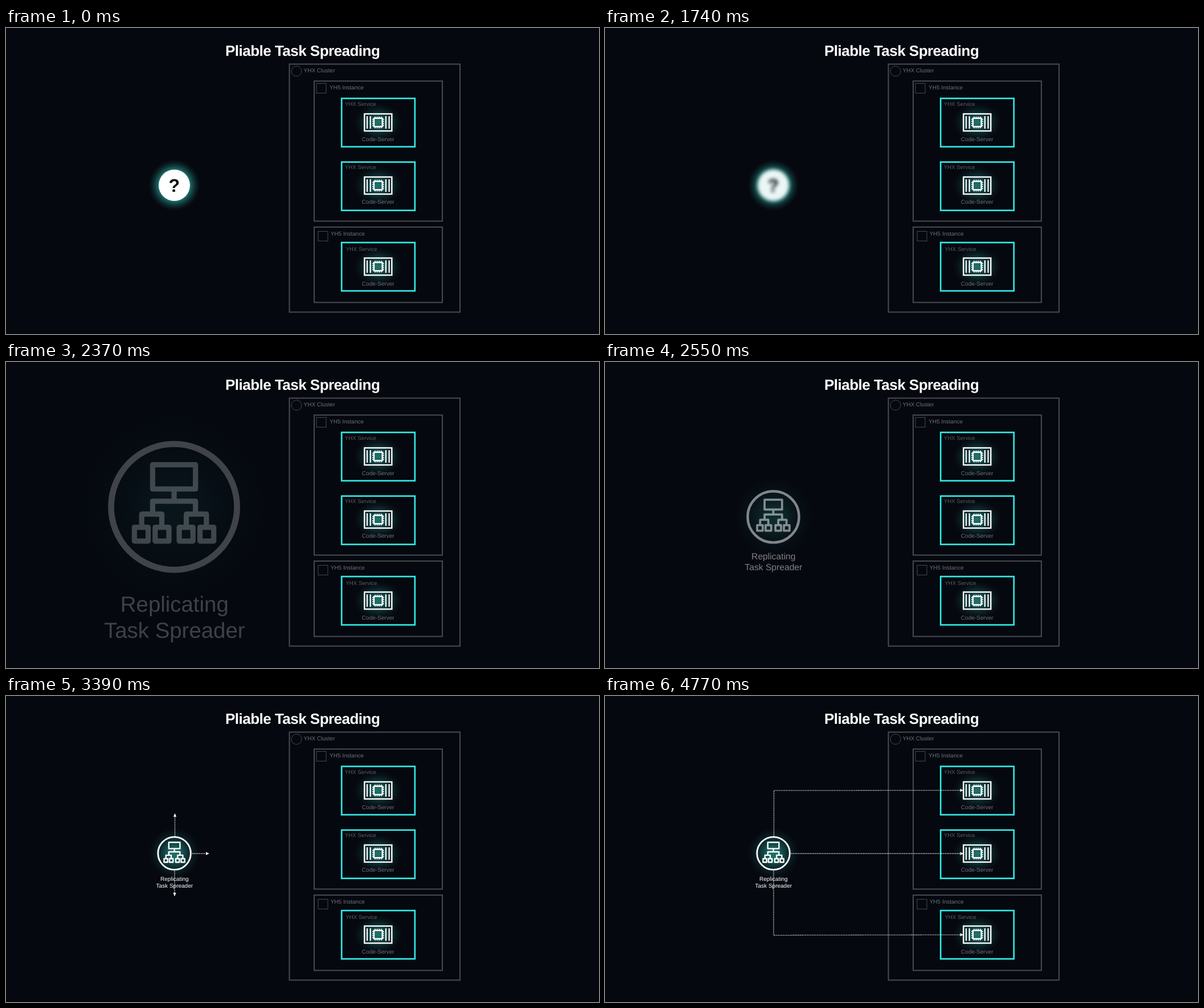
Recreate the animation shown at these times as an HTML page with a canvas. Size 1041x538 px, loop 6630 ms.

```html
<!DOCTYPE html>
<html lang="en">
<head>
<meta charset="utf-8">
<title>Pliable Task Spreading</title>
<style>
  html, body { margin: 0; width: 100%; height: 100%; overflow: hidden; background: #05080f; }
  canvas { display: block; width: 1041px; height: 538px; }
</style>
</head>
<body>
<canvas id="stage"></canvas>
<script>
const W = 1041, H = 538, LOOP = 6630;
const BG = '#05080f', FRAME = '#46484b', CYAN = '#30e8e4', WHITE = '#fff';
const FONT = '"Liberation Sans", Arial, sans-serif';
const canvas = document.getElementById('stage');
const ctx = canvas.getContext('2d');
const dpr = window.devicePixelRatio || 1;
canvas.width = W * dpr;
canvas.height = H * dpr;
ctx.textRendering = 'geometricPrecision';

const clamp = v => Math.min(1, Math.max(0, v));
const progress = (t, from, to) => clamp((t - from) / (to - from));
const easeInOut = u => u < 0.5 ? 2 * u * u : 1 - 2 * (1 - u) * (1 - u);

function text(str, x, y, size, color, { align = 'left', weight = '', spacing = 0 } = {}) {
  ctx.font = `${weight} ${size}px ${FONT}`;
  ctx.textAlign = align;
  ctx.letterSpacing = spacing + 'px';
  ctx.fillStyle = color;
  ctx.fillText(str, x, y);
}

function box(x1, y1, x2, y2, color, width) {
  ctx.strokeStyle = color;
  ctx.lineWidth = width;
  ctx.strokeRect(x1, y1, x2 - x1, y2 - y1);
}

function disc(x, y, r, fill) {
  ctx.fillStyle = fill;
  ctx.beginPath();
  ctx.arc(x, y, r, 0, Math.PI * 2);
  ctx.fill();
}

// Soft teal halo; flat below the inner radius.
function glow(x, y, inner, outer, alpha, squash = 1) {
  ctx.save();
  ctx.translate(x, y);
  ctx.scale(1, squash);
  const g = ctx.createRadialGradient(0, 0, inner, 0, 0, outer);
  for (let i = 0; i <= 6; i++) {
    const k = 1 - i / 6;
    g.addColorStop(i / 6, `rgba(48,185,172,${alpha * k * (0.35 + 0.65 * k)})`);
  }
  disc(0, 0, outer, g);
  ctx.restore();
}

function container(x, y) {
  glow(x, y, 4, 43, 0.58, 0.78);
  ctx.save();
  ctx.translate(x, y);
  box(-24, -15, 24, 15, WHITE, 2.4);
  box(-7.3, -7.3, 7.3, 7.3, WHITE, 2.4);
  ctx.beginPath();
  for (const bx of [-19.3, -13.6, 13.6, 19.3]) {
    ctx.moveTo(bx, -11);
    ctx.lineTo(bx, 11);
  }
  ctx.lineWidth = 2.2;
  ctx.stroke();
  ctx.beginPath();
  for (const p of [-5.4, -1.8, 1.8, 5.4]) {
    for (const s of [-1, 1]) {
      ctx.moveTo(p, 8 * s);
      ctx.lineTo(p, 10.3 * s);
      ctx.moveTo(8 * s, p);
      ctx.lineTo(10.3 * s, p);
    }
  }
  ctx.lineWidth = 1.7;
  ctx.stroke();
  ctx.restore();
}

function service(top, labelX, labelY, iconY, nameY) {
  box(589.2, top, 717.8, top + 85, CYAN, 2.7);
  text('YHX Service', labelX, labelY, 9.7, '#5c5e62');
  container(653.3, iconY);
  text('Code-Server', 653.2, nameY, 10, '#707276', { align: 'center' });
}

function diagram() {
  text('Pliable Task Spreading', 385, 49, 26, WHITE, { weight: 'bold', spacing: -0.52 });
  box(497.5, 63.5, 797, 499.5, FRAME, 2.1);
  box(541, 93.3, 766, 339.5, FRAME, 2.1);
  box(541, 350, 766, 482.5, FRAME, 2.1);

  ctx.lineWidth = 1;
  ctx.strokeStyle = FRAME;
  ctx.beginPath();
  ctx.arc(510, 76, 9, 0, Math.PI * 2);
  ctx.stroke();
  box(545, 97.5, 562, 114.5, FRAME, 1);
  box(548, 357.5, 565, 374.5, FRAME, 1);

  text('YHX Cluster', 522.5, 77.6, 10, '#6e7074');
  text('YH5 Instance', 568, 108.3, 10, '#6e7074');
  text('YH5 Instance', 569.7, 365.3, 10, '#6e7074');
  service(123.8, 594.7, 137.4, 166, 199);
  service(235.7, 594.7, 247.9, 277, 309);
  service(377.2, 596.4, 391.8, 419.5, 453);
}

function question(t) {
  if (t >= 2070) return;
  const out = progress(t, 1710, 2070);
  ctx.save();
  ctx.globalAlpha = 1 - out;
  glow(295.5, 276.5, 23, 45, 0.85);
  if (t >= 1725) ctx.filter = `blur(${(3 + out) * dpr}px)`;
  disc(295.5, 276.5, 27.5, WHITE);
  ctx.globalAlpha = 1;
  text('?', 295.3, 288, 32, BG, { align: 'center', weight: 'bold' });
  ctx.restore();
}

function line(...pts) {
  ctx.moveTo(pts[0], pts[1]);
  for (let i = 2; i < pts.length; i += 2) ctx.lineTo(pts[i], pts[i + 1]);
}

function balancer(t) {
  const u = progress(t, 2190, 2880);
  if (u <= 0) return;
  const scale = 1 + 8.75 * Math.pow(1 - u, 3.7);
  ctx.save();
  ctx.globalAlpha = Math.pow(u, 1.1);
  ctx.translate(295.8, 284.3);
  ctx.scale(scale, scale);
  ctx.translate(-0.2, -7.7);
  glow(0, 0, 8, 45, 0.56 * (0.4 + 0.6 * u));

  ctx.strokeStyle = WHITE;
  ctx.lineWidth = 2.8;
  ctx.beginPath();
  ctx.arc(0, 0, 28.8, 0, Math.PI * 2);
  ctx.stroke();

  ctx.lineJoin = 'round';
  ctx.lineWidth = 2.4;
  ctx.beginPath();
  ctx.rect(-9.8, -19.3, 19.6, 11.1);
  line(0, -8.2, 0, -2.6);
  line(-9.8, 3.3, -9.8, -2.6, 9.8, -2.6, 9.8, 3.3);
  for (const s of [-1, 1]) {
    line(14.8 * s, 9.3, 14.8 * s, 3.3, 5.6 * s, 3.3, 5.6 * s, 9.3);
    for (const x of [15, 5.5]) ctx.rect(x * s - 3.15, 9.35, 6.3, 6.3);
  }
  ctx.stroke();

  text('Replicating', 0.2, 48, 10, WHITE, { align: 'center' });
  text('Task Spreader', 0.2, 60, 10, WHITE, { align: 'center' });
  ctx.restore();
}

// Draws the first part of a dotted polyline, tipped with an arrowhead.
function arrow(pts, part) {
  const legs = pts.slice(1).map((p, i) => Math.hypot(p[0] - pts[i][0], p[1] - pts[i][1]));
  let left = part * legs.reduce((a, b) => a + b, 0);
  let [x, y] = pts[0], angle = 0;
  ctx.beginPath();
  ctx.moveTo(x, y);
  for (let i = 0; i < legs.length && left > 0; i++) {
    const [ax, ay] = pts[i], [bx, by] = pts[i + 1];
    const k = Math.min(1, left / legs[i]);
    x = ax + (bx - ax) * k;
    y = ay + (by - ay) * k;
    angle = Math.atan2(by - ay, bx - ax);
    ctx.lineTo(x, y);
    left -= legs[i];
  }
  ctx.save();
  ctx.strokeStyle = WHITE;
  ctx.lineWidth = 1.3;
  ctx.setLineDash([1.4, 1.6]);
  ctx.stroke();
  ctx.translate(x, y);
  ctx.rotate(angle);
  ctx.fillStyle = WHITE;
  ctx.beginPath();
  line(0, 0, -5.5, -2.7, -5.5, 2.7);
  ctx.fill();
  ctx.restore();
}

const ROUTES = [
  [[296.5, 247], [296.5, 166.2], [629, 165.8]],
  [[327, 277], [629, 277]],
  [[296, 308], [296, 420.6], [629, 419.8]]
];

function draw(t) {
  ctx.setTransform(dpr, 0, 0, dpr, 0, 0);
  ctx.fillStyle = BG;
  ctx.fillRect(0, 0, W, H);
  question(t);
  balancer(t);
  diagram();
  const part = easeInOut(progress(t, 3000, 4770));
  if (part > 0) ROUTES.forEach(route => arrow(route, part));
}

const start = performance.now();
function tick() {
  draw((performance.now() - start) % LOOP);
  requestAnimationFrame(tick);
}
tick();
</script>
</body>
</html>
```
